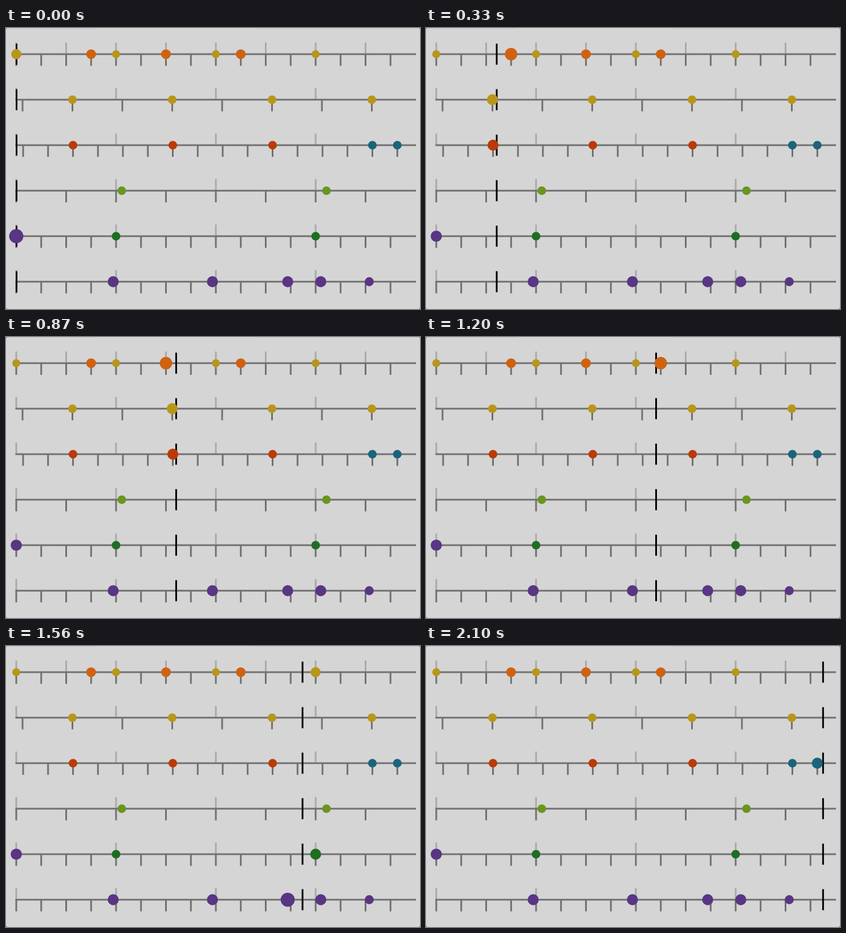
These frames come from a looping animation (726x494 px, 2.13 s). An HTML page with a canvas:

```html
<!DOCTYPE html>
<html lang="en">
<head>
<meta charset="utf-8">
<title>Rhythm lanes</title>
<style>
  html, body { margin: 0; width: 100%; height: 100%; overflow: hidden; background: #555; }
  canvas { display: block; width: 726px; height: 494px; }
</style>
</head>
<body>
<canvas id="stage" width="726" height="494"></canvas>
<script>
const ctx = document.getElementById('stage').getContext('2d');

const LOOP = 2130, STEP = 30;
const LEFT = 18, BEAT = 43.75, END = 719;
const HIT = 28, GROW = 1.27;

const GOLD = '#b8961a', ORANGE = '#cf6210', RED = '#bb3a07', TEAL = '#1b647c',
      LIME = '#69961f', GREEN = '#1e6e22', PURPLE = '#593584';

// up: beats between upper ticks; down: beats between lower ticks; shift: lower offset
// dots: [x, radius, colour]
const lanes = [
  { up: 2, down: 1, shift: 0, dots: [
    [18, 7, GOLD], [149.2, 8.6, ORANGE], [193, 7, GOLD], [280.5, 8.6, ORANGE],
    [368, 7, GOLD], [411.7, 8.6, ORANGE], [543, 7, GOLD]] },
  { up: 4, down: 2, shift: 11, dots: [116.5, 291.5, 466.5, 641.5].map(x => [x, 7.6, GOLD]) },
  { up: 4, down: 1, shift: 12, dots: [
    [117.5, 7.6, RED], [292.5, 7.6, RED], [467.5, 7.6, RED],
    [642.5, 7.6, TEAL], [686.2, 7.6, TEAL]] },
  { up: 4, down: 2, shift: 0, dots: [[203, 7.6, LIME], [562, 7.6, LIME]] },
  { up: 4, down: 1, shift: 0, dots: [[18, 9.8, PURPLE], [193, 7.6, GREEN], [543, 7.6, GREEN]] },
  { up: 4, down: 1, shift: 0, dots: [
    [188, 9.7, PURPLE], [362, 9.7, PURPLE], [494, 9.7, PURPLE],
    [552, 9.7, PURPLE], [637, 7.9, PURPLE]] }
];

// Playhead path as [ms, x], with one short stall
const path = [[0, 18.5], [330, 124], [870, 298.4], [1080, 366], [1110, 366],
  [1140, 384.2], [1200, 403.5], [1560, 520], [1890, 630.2], [2100, 696.3]];

function headAt(t) {
  const i = Math.max(1, path.findIndex(p => p[0] >= t));
  const [t0, x0] = path[i - 1], [t1, x1] = path[i];
  return x0 + (x1 - x0) * (t - t0) / (t1 - t0);
}

function bar(x, top, bottom, color) {
  ctx.fillStyle = color;
  ctx.fillRect(x - 1.5, top, 3, bottom - top);
}

function drawLane(lane, y, head) {
  for (let b = 0; b < 16; b += lane.up) bar(LEFT + b * BEAT, y - 20.5, y, '#aaa');
  for (let b = 0; b < 16; b += lane.down) bar(LEFT + lane.shift + b * BEAT, y, y + 20.5, '#707070');
  ctx.fillRect(LEFT - 1.5, y - 1.5, END - LEFT + 1.5, 3);
  bar(head, y - 18.5, y + 18.5, '#000');
  for (const [x, r, color] of lane.dots) {
    ctx.fillStyle = color;
    ctx.beginPath();
    ctx.arc(x, y, Math.abs(x - head) < HIT ? r * GROW : r, 0, Math.PI * 2);
    ctx.fill();
  }
}

function draw(now) {
  const t = Math.floor((now % LOOP) / STEP) * STEP;
  const head = headAt(t);
  ctx.fillStyle = '#555';
  ctx.fillRect(0, 0, 726, 494);
  ctx.fillStyle = '#d5d5d5';
  ctx.beginPath();
  ctx.roundRect(0, 0, 726, 494, 3);
  ctx.fill();
  ctx.fillStyle = '#c6c6c6';
  ctx.fillRect(3, 0, 157, 1);
  ctx.fillRect(435, 0, 288, 1);
  lanes.forEach((lane, i) => drawLane(lane, 46 + 80 * i, head));
}

const start = performance.now();
function tick() {
  draw(performance.now() - start);
  requestAnimationFrame(tick);
}
tick();
</script>
</body>
</html>
```
